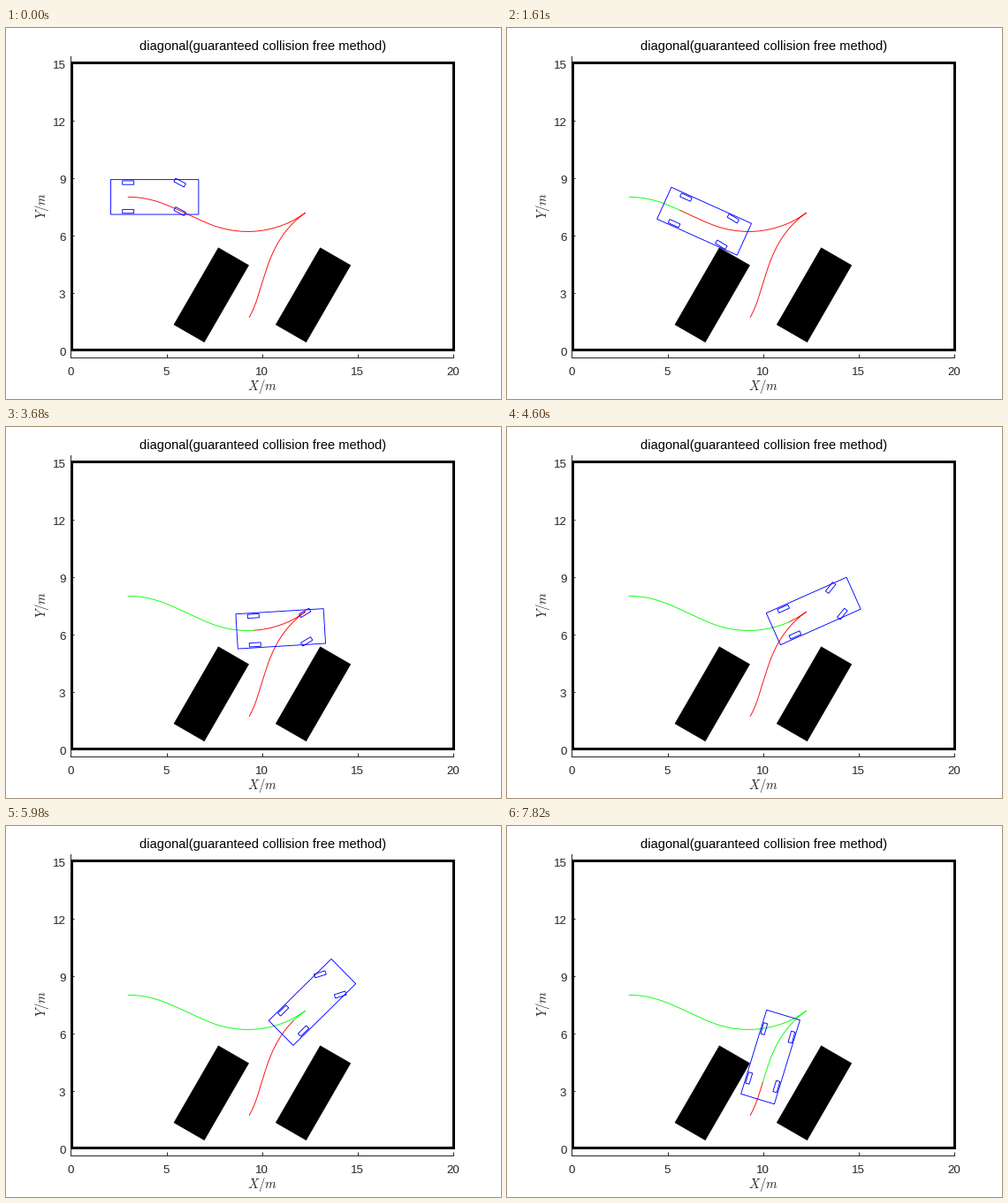
Write a matplotlib script that moves like this. It is 560x420 px and loops after 8000 ms.

```python
import numpy as np
import matplotlib.pyplot as plt
from matplotlib.animation import FuncAnimation
from matplotlib.patches import Polygon, Rectangle

W, H = 560, 420
PX = 0.72                       # one pixel in points at 100 dpi
THIN = 0.9 * PX
LEFT, RIGHT, TOP, BOTTOM = 73.2, 506.4, 32.0, 372.6
ZERO_Y = 364.6
SCALE = (RIGHT - LEFT) / 20     # pixels per metre
GREY = "#262626"

LOOP, TICK, STEP, LAST = 8000, 40, 230, 34

plt.rcParams["font.family"] = "Liberation Sans"
plt.rcParams["mathtext.fontset"] = "cm"

# Car dimensions in metres, measured from the rear axle
REAR, FRONT, HALF = -0.91, 3.68, 0.91
BASE, TRACK = 2.7, 0.75
WHEEL_L, WHEEL_W = 0.6, 0.2

# Rear-axle waypoints: travelled steps, x, y, heading in degrees
SPEED = 0.46
CUSP = 21.25
AHEAD = np.array([
    (0, 3.0, 8.0, 0), (4, 4.806, 7.664, -20.5), (6, 5.66, 7.304, -24.3),
    (10, 7.341, 6.551, -21.2), (15, 9.584, 6.205, 3.5),
    (19, 11.362, 6.648, 24.0), (CUSP, 12.253, 7.175, 35.3)])
BACK = np.array([
    (CUSP, 12.253, 7.175, 35.3), (23, 11.63, 6.653, 44.6),
    (27, 10.584, 5.145, 64.9), (31, 9.977, 3.435, 73.0),
    (35.05, 9.317, 1.699, 60.0)])
END = BACK[-1, 0]

STEER_AT = [0, 4.4, 7, 9.6, 11, 21.85, 24.65, 30, 33.2, 35]
STEER = [-28, -28, -7, 0, 28, 27, -27, -27, 0, 3]


def hermite(knots, gear, u):
    """Position and tangent on a cubic through the waypoints."""
    i = np.clip(np.searchsorted(knots[:, 0], u, "right") - 1, 0, len(knots) - 2)
    a, b = knots[i], knots[i + 1]
    h = (b[:, 0] - a[:, 0])[:, None]
    t = (u - a[:, 0])[:, None] / h

    def slope(k):
        ang = np.radians(k[:, 3])
        return gear * SPEED * h * np.column_stack([np.cos(ang), np.sin(ang)])

    p, q, m, n = a[:, 1:3], b[:, 1:3], slope(a), slope(b)
    pos = ((2*t**3 - 3*t**2 + 1) * p + (t**3 - 2*t**2 + t) * m
           + (3*t**2 - 2*t**3) * q + (t**3 - t**2) * n)
    vel = ((6*t**2 - 6*t) * (p - q) + (3*t**2 - 4*t + 1) * m
           + (3*t**2 - 2*t) * n)
    return pos, gear * vel


def route(u):
    """Rear-axle positions and heading vectors for travelled steps u."""
    u = np.atleast_1d(np.asarray(u, float))
    ahead = (u <= CUSP)[:, None]
    p1, v1 = hermite(AHEAD, 1, np.minimum(u, CUSP))
    p2, v2 = hermite(BACK, -1, np.maximum(u, CUSP))
    return np.where(ahead, p1, p2), np.where(ahead, v1, v2)


def ramp(t):
    """Distance after t steps, speeding up from rest over two steps."""
    return t * t / 4 if t < 2 else t - 1


def travelled(k):
    stop = CUSP + 2
    if k >= stop:
        return CUSP + ramp(k - stop)
    return ramp(k) if k < stop - 2 else CUSP - ramp(stop - k)


def turn(pts, ang, at=(0, 0)):
    c, s = np.cos(ang), np.sin(ang)
    return np.asarray(pts) @ np.array([[c, s], [-s, c]]) + at


def box(x0, x1, half):
    return np.array([(x0, -half), (x1, -half), (x1, half), (x0, half)])


def write(x, y, text, size, **kw):
    fig.text(x / W, 1 - y / H, text, fontsize=size * PX, **kw)


fig = plt.figure(figsize=(5.6, 4.2), dpi=100, facecolor="white")
ax = fig.add_axes([LEFT / W, 1 - BOTTOM / H, (RIGHT - LEFT) / W, (BOTTOM - TOP) / H])
ax.set_xlim(0, 20)
ax.set_ylim((ZERO_Y - BOTTOM) / SCALE, (ZERO_Y - TOP) / SCALE)
ax.set_xticks(range(0, 21, 5))
ax.set_yticks(range(0, 16, 3))
ax.tick_params(direction="in", length=4.3 * PX, width=PX, color=GREY,
               labelbottom=False, labelleft=False)
for side in ("top", "right"):
    ax.spines[side].set_visible(False)
for side in ("left", "bottom"):
    ax.spines[side].set(linewidth=PX, color=GREY)

for x in range(0, 21, 5):
    write(LEFT - 0.3 + x * SCALE, 393, str(x), 13.33, color=GREY,
          ha="center", va="baseline")
for y in range(0, 16, 3):
    write(67.5, ZERO_Y - y * SCALE + 6.2, str(y), 13.33, color=GREY,
          ha="right", va="baseline")
write(290.5, 25, "diagonal(guaranteed collision free method)", 14.67,
      color="black", ha="center", va="baseline")
write(290, 405.5, "$X/m$", 14.67, color=GREY, ha="center", va="center")
write(41.2, 201, "$Y/m$", 14.67, color=GREY, ha="center", va="center", rotation=90)

ax.add_patch(Rectangle((0.06, 0.05), 19.9, 14.96, fill=False, ec="black",
                       lw=3 * PX, clip_on=False, zorder=3))
for cx in (7.345, 12.665):
    slot = turn(box(-2.32, 2.32, 0.915), np.pi / 3, (cx, 2.88))
    ax.add_patch(Polygon(slot, fc="black", ec="black", lw=0.5 * PX, zorder=2))

left, = ax.plot([], [], color="red", lw=THIN, zorder=4)
done, = ax.plot([], [], color="lime", lw=THIN, zorder=5)
GRID = np.arange(0, END, 0.05)


def outline():
    return ax.add_patch(Polygon(np.zeros((4, 2)), fill=False, ec="blue",
                                lw=THIN, snap=False, zorder=6))


body = outline()
wheels = [(outline(), x, y) for x in (0, BASE) for y in (-TRACK, TRACK)]
WHEEL = box(-WHEEL_L / 2, WHEEL_L / 2, WHEEL_W / 2)


def draw(i):
    k = min((i * TICK + 30) // STEP, LAST)
    u = travelled(k)
    pos, vel = route(u)
    ang = np.arctan2(vel[0, 1], vel[0, 0])
    steer = np.radians(np.interp(k, STEER_AT, STEER))
    done.set_data(*route(np.append(GRID[GRID < u], u))[0].T)
    left.set_data(*route(np.append(u, GRID[GRID > u]))[0].T)
    body.set_xy(turn(box(REAR, FRONT, HALF), ang, pos[0]))
    for patch, x, y in wheels:
        shape = turn(WHEEL, steer if x else 0, (x, y))
        patch.set_xy(turn(shape, ang, pos[0]))
    return [left, done, body] + [w[0] for w in wheels]


anim = FuncAnimation(fig, draw, frames=LOOP // TICK, interval=TICK,
                     init_func=lambda: draw(0), repeat=True, repeat_delay=0)
plt.show()
```
